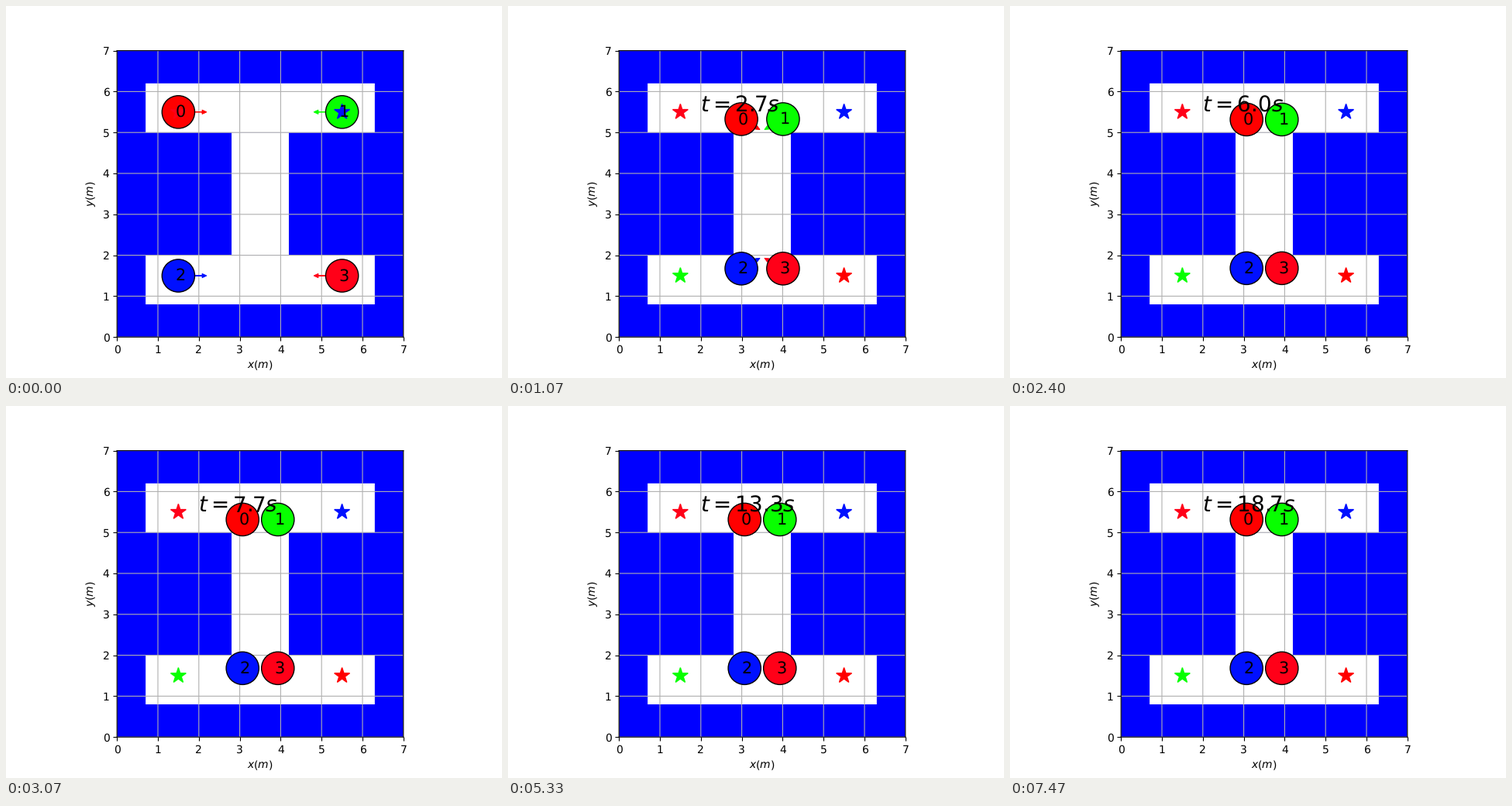
These frames come from a looping animation (640 by 480 pixels, 7.53 s). A matplotlib script:

```python
import numpy as np
import matplotlib.pyplot as plt
from matplotlib.animation import FuncAnimation
from matplotlib.patches import Circle, FancyArrow, PathPatch, Rectangle
from matplotlib.path import Path

plt.rcParams['path.snap'] = False
plt.rcParams['text.hinting'] = 'no_hinting'

SIZE = 7
MID = SIZE / 2
FRAMES, INTERVAL = 251, 30
RADIUS, STAR, HEAD = 0.4, 0.197, 0.11
SPEED, BRAKE, STOP = 0.581, 2.16, 3.24
DROP, DROP_FROM, DROP_TO = 0.183, 1.26, 2.93
COLORS = plt.cm.hsv(np.linspace(0, 1, 4))
START = [(1.5, 5.5), (5.5, 5.5), (1.5, 1.5), (5.5, 1.5)]

fig = plt.figure(figsize=(6.4, 4.8), dpi=100)
ax = fig.add_subplot(111, aspect='equal')
ax.set(xlim=(0, SIZE), ylim=(0, SIZE), xticks=range(SIZE + 1),
       yticks=range(SIZE + 1), xlabel='$x(m)$', ylabel='$y(m)$')
ax.grid(True)

ax.add_patch(Rectangle((0, 0), SIZE, SIZE, color='blue', lw=0))
for x, y, w, h in [(0.7, 5, 5.6, 1.2), (2.8, 2, 1.4, 3), (0.7, 0.8, 5.6, 1.2)]:
    ax.add_patch(Rectangle((x, y), w, h, color='white', lw=0))


def ramp(t, start, end):
    return np.clip((t - start) / (end - start), 0, 1)


def motion(t):
    """Offset and heading vector for a robot that comes from the top left."""
    brake = ramp(t, BRAKE, STOP)
    s = ramp(t, DROP_FROM, DROP_TO)
    turn = s * s * (3 - 2 * s)
    dx = SPEED * (min(t, STOP) - brake ** 2 * (STOP - BRAKE) / 2)
    speed = SPEED * np.sqrt(1 - brake)
    angle = np.radians(-31) * turn
    return dx, -DROP * turn, speed * np.cos(angle), speed * np.sin(angle)


class Robot:
    def __init__(self, i):
        color = COLORS[i]
        self.x, self.y = START[i]
        self.sx = np.sign(MID - self.x)
        self.sy = np.sign(self.y - MID)
        self.arrow = ax.add_patch(FancyArrow(
            self.x, self.y, SPEED * self.sx, 0, width=0.001,
            head_width=0.1, head_length=HEAD, color=color, lw=0.7, zorder=2))
        self.body = ax.add_patch(Circle(
            START[i], RADIUS, fc=color, ec='black', lw=1, zorder=2))
        star = Path.unit_regular_star(5, 0.382)
        goal = Path(star.vertices * STAR + START[3 - i], star.codes)
        ax.add_patch(PathPatch(goal, color=color, lw=1, joinstyle='bevel',
                               zorder=2))
        self.label = ax.text(0, 0, str(i), fontsize=15)

    def move(self, t):
        dx, dy, vx, vy = motion(t)
        x, y = self.x + self.sx * dx, self.y + self.sy * dy
        self.body.center = x, y
        self.arrow.set_data(x=x, y=y, dx=self.sx * vx, dy=self.sy * vy)
        self.label.set_position((x - 0.08, y - 0.12))


robots = [Robot(i) for i in range(4)]
clock = ax.text(1.99, 5.5, '', fontsize=20)


def sim_step(ms):
    """Step of the 25 fps simulation shown on a 30 fps clock."""
    tick = (ms + 4) * 3 // 100
    return (5 * tick + 2) // 6


def update(frame):
    step = sim_step(frame * INTERVAL + 20)
    for robot in robots:
        robot.move(step / 10)
    clock.set_text(f'$t={step / 10:.1f}s$' if step else '')
    return [clock]


anim = FuncAnimation(fig, update, frames=FRAMES, interval=INTERVAL,
                     repeat=True, repeat_delay=0, blit=False)
plt.show()
```
